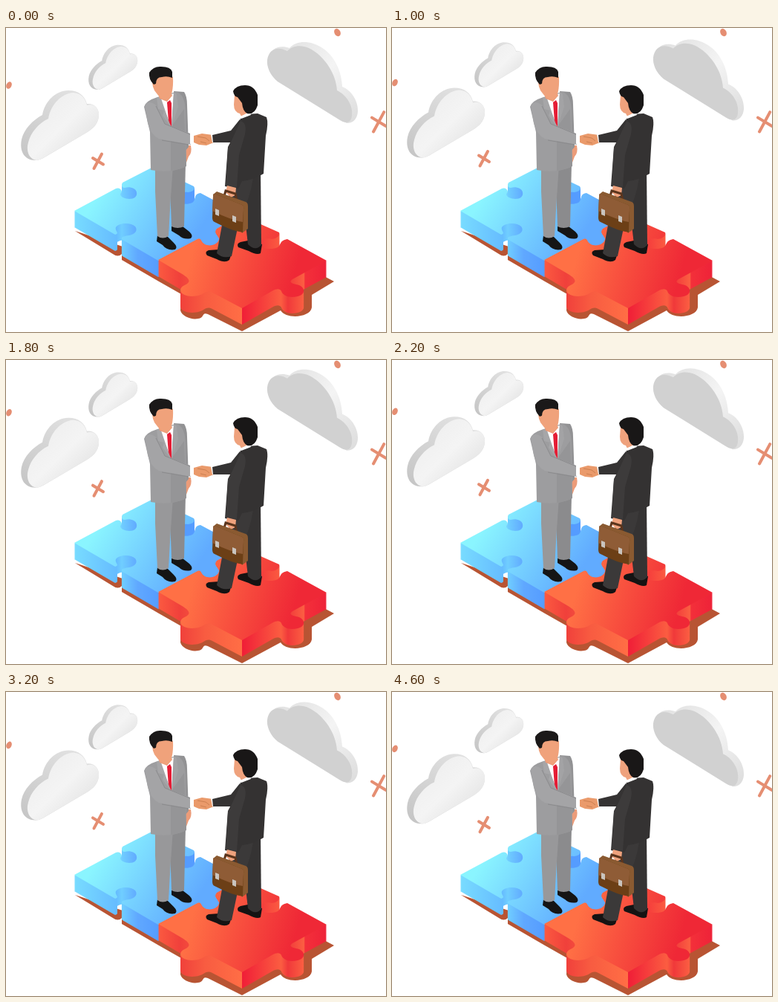
An HTML page that plays this animation: 512 px wide and 409 px high, repeating every 4800 ms.

```html
<!DOCTYPE html>
<html lang="en">
<head>
<meta charset="utf-8">
<title>Handshake on puzzle pieces</title>
<style>
html, body { margin: 0; width: 100%; height: 100%; overflow: hidden; background: #fff; }
svg { display: block; width: 512px; height: 409px; }
</style>
</head>
<body>
<svg viewBox="0 0 512 409">
  <defs>
    <linearGradient id="blueTop" gradientUnits="userSpaceOnUse" x1="130" y1="215" x2="250" y2="290">
      <stop stop-color="#8af5ff"/><stop offset="1" stop-color="#61abff"/>
    </linearGradient>
    <linearGradient id="blueSide" gradientUnits="userSpaceOnUse" x1="92" y1="0" x2="206" y2="0">
      <stop stop-color="#78dcff"/><stop offset=".5" stop-color="#66bcff"/>
      <stop offset=".56" stop-color="#70ceff"/><stop offset=".75" stop-color="#60a8ff"/>
      <stop offset="1" stop-color="#559cff"/>
    </linearGradient>
    <linearGradient id="redTop" gradientUnits="userSpaceOnUse" x1="250" y1="305" x2="385" y2="345">
      <stop stop-color="#ff7045"/><stop offset="1" stop-color="#ef2836"/>
    </linearGradient>
    <linearGradient id="redSide" gradientUnits="userSpaceOnUse" x1="205" y1="0" x2="432" y2="0">
      <stop stop-color="#fb5a40"/><stop offset=".13" stop-color="#f0403b"/>
      <stop offset=".28" stop-color="#f85c41"/><stop offset=".498" stop-color="#ff6e45"/>
      <stop offset=".498" stop-color="#f01e37"/><stop offset=".73" stop-color="#fb5d41"/>
      <stop offset=".77" stop-color="#f0393a"/><stop offset=".865" stop-color="#fb5f42"/>
      <stop offset=".872" stop-color="#f3303a"/><stop offset="1" stop-color="#ee2238"/>
    </linearGradient>
    <linearGradient id="cloudFace" x1="0" y1="0" x2="1" y2="1">
      <stop stop-color="#ececec"/><stop offset=".5" stop-color="#f4f4f4"/><stop offset="1" stop-color="#dadada"/>
    </linearGradient>
    <linearGradient id="cloudBack" x1="0" y1="1" x2=".6" y2="0">
      <stop stop-color="#c4c4c4"/><stop offset="1" stop-color="#e0e0e0"/>
    </linearGradient>
    <linearGradient id="cloudRim" x1="0" y1="0" x2="1" y2="1">
      <stop stop-color="#dedede"/><stop offset=".5" stop-color="#f4f4f4"/><stop offset="1" stop-color="#dcdcdc"/>
    </linearGradient>
    <g id="cloud">
      <path fill="url(#cloudBack)" d="M40 178C24 178 18 165 21 150C24 136 36 124 49 117C52 99 67 84 84 84C98 84 106 91 109 102C119 101 126 108 125 119C124 129 117 136 108 141L50 175Q45 178 40 178Z"/>
      <path fill="url(#cloudFace)" d="M41 178C30 176 27 164 30 154C33 141 44 128 57 122C60 104 74 88 91 87C102 88 107 95 109 104C119 101 126 108 125 119C124 129 117 136 108 141L50 175Q45 178 41 178Z"/>
    </g>
    <path id="cross" fill="none" stroke="#e58e72" stroke-width="4" stroke-linecap="round" vector-effect="non-scaling-stroke" d="M-7 -4L7 4.500M5 -9.500L-5.500 10"/>
    <path id="blue" d="M92 246L148 216C152 214 158 218 155 222C152 227 160 230 166 230C174 230 177 226 176 221C175 215 166 213 160 215C156 215 155 212 157 208L198 187L253 213C256 218 250 221 245 221C235 220 227 224 227 229C228 236 243 239 251 235C257 231 252 223 262 222L318 252L312 256L284 271C280 275 284 277 287 283C288 290 276 295 268 291C262 288 264 282 258 285L205 313L157 285C153 281 160 280 166 279C174 278 178 272 174 267C168 261 152 262 148 268C146 273 154 276 147 278Z"/>
    <path id="red" d="M205 312L258 284C264 282 262 288 268 291C276 295 288 290 287 283C284 277 280 275 284 270L316 252L368 275C370 281 362 284 358 284C350 282 341 285 341 290C342 297 358 299 366 295C371 292 368 286 379 284L432 313L386 338C379 343 388 344 395 346C404 350 403 359 393 361C382 364 373 360 371 354C369 350 364 351 360 353L318 377L278 356C270 352 268 357 262 359C252 363 236 361 235 353C235 346 244 346 246 342C248 338 243 335 239 332Z"/>
  </defs>

  <g class="float">
    <use href="#cloud"/>
    <use href="#cloud" transform="translate(98.400 -31) scale(.63 .64)"/>
    <path fill="url(#cloudRim)" d="M366 72C356 63 351 52 353 41C356 28 368 22 382 27C389 19 402 17 414 21C437 28 452 52 453 79C466 84 475 99 474 113C473 122 468 128 459 128Z"/>
    <path fill="#d1d1d1" d="M366 72C356 64 351 52 352 43C354 28 366 24 379 31C385 24 397 22 408 27C429 37 445 62 446 84C459 90 468 105 466 118C465 128 458 129 450 124Z"/>
    <ellipse cx="4" cy="77" rx="3.500" ry="5" fill="#e58e72" transform="rotate(25 4 77)"/>
    <use href="#cross" x="124" y="179"/>
  </g>
  <ellipse cx="446.500" cy="6" rx="4" ry="5.500" fill="#e58e72" transform="rotate(-28 446.500 6)"/>
  <use href="#cross" transform="translate(502.500 126) scale(1.350)"/>

  <!-- platform: shadow, walls, tops -->
  <path fill="#b85433" d="M93 273L144 304Q151 309 156 304V312L206 341L236 358L235 380C237 388 250 393 259 391C268 390 263 382 272 385L318 408L370 380C377 392 410 390 412 376V359L442 341L425 332L206 310Z"/>
  <g class="wall" data-top="#blue" data-depth="22" fill="url(#blueSide)"></g>
  <g class="wall" data-top="#red" data-depth="22" fill="url(#redSide)"></g>
  <use href="#blue" fill="url(#blueTop)"/>
  <use href="#red" fill="url(#redTop)"/>

  <!-- man in grey -->
  <g>
    <path fill="#151515" d="M204 279L218 281L226 289Q232 295 228 298Q217 300 211 292L203 287ZM223 266L238 267L247 274Q253 280 249 283Q239 285 233 279L223 273Z"/>
    <path fill="#8b8b8d" d="M220 184L242 182L240 267Q231 271 223 267Z"/>
    <path fill="#98989a" d="M201 184L225 185L222 228L219 280Q211 285 204 280L201 220Z"/>
    <path fill="#ec9c79" d="M242 158H249Q251 168 246 173L243 181L240 176Z"/>
    <path fill="#929294" d="M226 85L240 86Q244 92 244 103L246 160L241 166L233 133Z"/>
    <path fill="#9d9d9f" d="M204 93L229 86Q241 88 242 112L243 186Q222 196 195 191L194 140L186 106Q188 98 204 93Z"/>
    <path fill="#959597" d="M222 134L240 109L243 186Q232 191 222 192Z"/>
    <path fill="#fff" d="M207 94L226 88L223 134Z"/>
    <path fill="#e51d35" d="M217 100L221 97L223 101L223 133L219 126Z"/>
    <path fill="#a6a6a8" d="M203 94L208 92L222 133L211 118L213 111L205 109Z"/>
    <path fill="#a3a3a5" d="M226 86L230 89L232 106L223 133Z"/>
    <path fill="#ec9c79" d="M204 84H221L224 91L217 99L207 95Z"/>
    <path fill="#f0a27b" d="M197 66L217 62L225 66Q226 90 218 97Q210 98 203 88Q196 81 197 66Z"/>
    <path fill="#1b1919" d="M193 60Q199 51 209 52Q222 52 224 59L224 67Q217 64 210 66Q202 66 202 75L199 76Q192 69 193 60Z"/>
    <path fill="#a4a4a6" d="M187 104Q193 96 202 104L214 129L251 143L249 157L206 149Q195 144 191 128Z"/>
    <path fill="none" stroke="#8b8b8d" d="M202 105L214 129L248 143M210 151L246 157"/>
    <path fill="#fff" d="M248 142H253L252 157L248 156Z"/>
  </g>

  <!-- man in black -->
  <g>
    <path fill="#151313" d="M287 298L304 303L301 312Q295 317 284 311L271 306Q267 301 273 299ZM326 286L345 291L343 303Q338 306 327 300L313 295Q310 290 316 288Z"/>
    <path fill="#353333" d="M318 196L343 190L344 292Q336 301 326 291L321 247Z"/>
    <path fill="#3b3939" d="M306 203L333 202Q329 230 315 255L304 307Q292 311 284 303L292 260Z"/>
    <path fill="#ea9a6b" d="M253 145L264 142L279 144L280 154L270 158L260 157L253 154Z"/>
    <path fill="none" stroke="#cc7f50" d="M258 146L269 148L274 152M262 153L270 155"/>
    <path fill="#fff" d="M276 143H280L281 154L278 154Z"/>
    <path fill="#353333" d="M278 144L303 138L315 123L323 135L310 154L279 154Z"/>
    <path fill="#343232" d="M316 122Q324 115 339 115L351 120Q354 128 350 145L347 196Q332 205 318 206L313 216L295 213L299 160L310 139Z"/>
    <path fill="#3d3b3b" d="M316 125Q325 127 322 143L314 171L311 214L296 212L299 162Z"/>
    <path fill="#efa27d" d="M308 90L321 88L327 113L317 119L315 115Q307 113 307 103Z"/>
    <path fill="#fff" d="M315 119L328 114L330 117L317 122Z"/>
    <path fill="#191717" d="M306 85Q310 77 322 77Q334 77 339 90L339 104Q335 117 325 115Q319 112 318 101L315 97L312 93Q307 92 306 85Z"/>
    <path fill="#efa27d" d="M298 212L310 215L309 225L303 228L296 221Z"/>
  </g>

  <!-- briefcase -->
  <g>
    <path fill="none" stroke="#5b351d" stroke-width="3" d="M294 226L296 219L309 223L311 232"/>
    <path fill="#8a5a31" d="M279 224L284 220L323 234Q326 235 326 240V270L318 276L310 260Z"/>
    <path fill="#6c3f16" d="M281 223L318 238Q321 239 320 244L319 275Q304 273 281 261Q278 260 278 255L279 227Q279 223 281 223Z"/>
    <path fill="#8f5c36" d="M281 223L318 238Q321 239 320 244L319 261Q302 258 278 246L279 227Q279 223 281 223Z"/>
    <path fill="#c9c4be" d="M282 243L287 245V253L282 251ZM305 252L310 254V262L305 260Z"/>
  </g>
</svg>
<script>
const LOOP = 4800, STEP = 200, RISE = 8.4;
const floating = document.querySelector('.float');

// Extrude each piece downwards by stacking copies of its top.
for (const wall of document.querySelectorAll('.wall')) {
  const { top, depth } = wall.dataset;
  for (let y = 1; y <= depth; y++) {
    const slice = document.createElementNS(wall.namespaceURI, 'use');
    slice.setAttribute('href', top);
    slice.setAttribute('y', y);
    wall.append(slice);
  }
}

function draw(now) {
  const t = Math.floor(now % LOOP / STEP) * STEP;
  const y = -RISE * (1 - Math.abs(1 - 2 * t / LOOP));
  floating.setAttribute('transform', `translate(0 ${y.toFixed(2)})`);
}

const start = performance.now();
function tick() {
  draw(performance.now() - start);
  requestAnimationFrame(tick);
}
tick();
</script>
</body>
</html>
```
